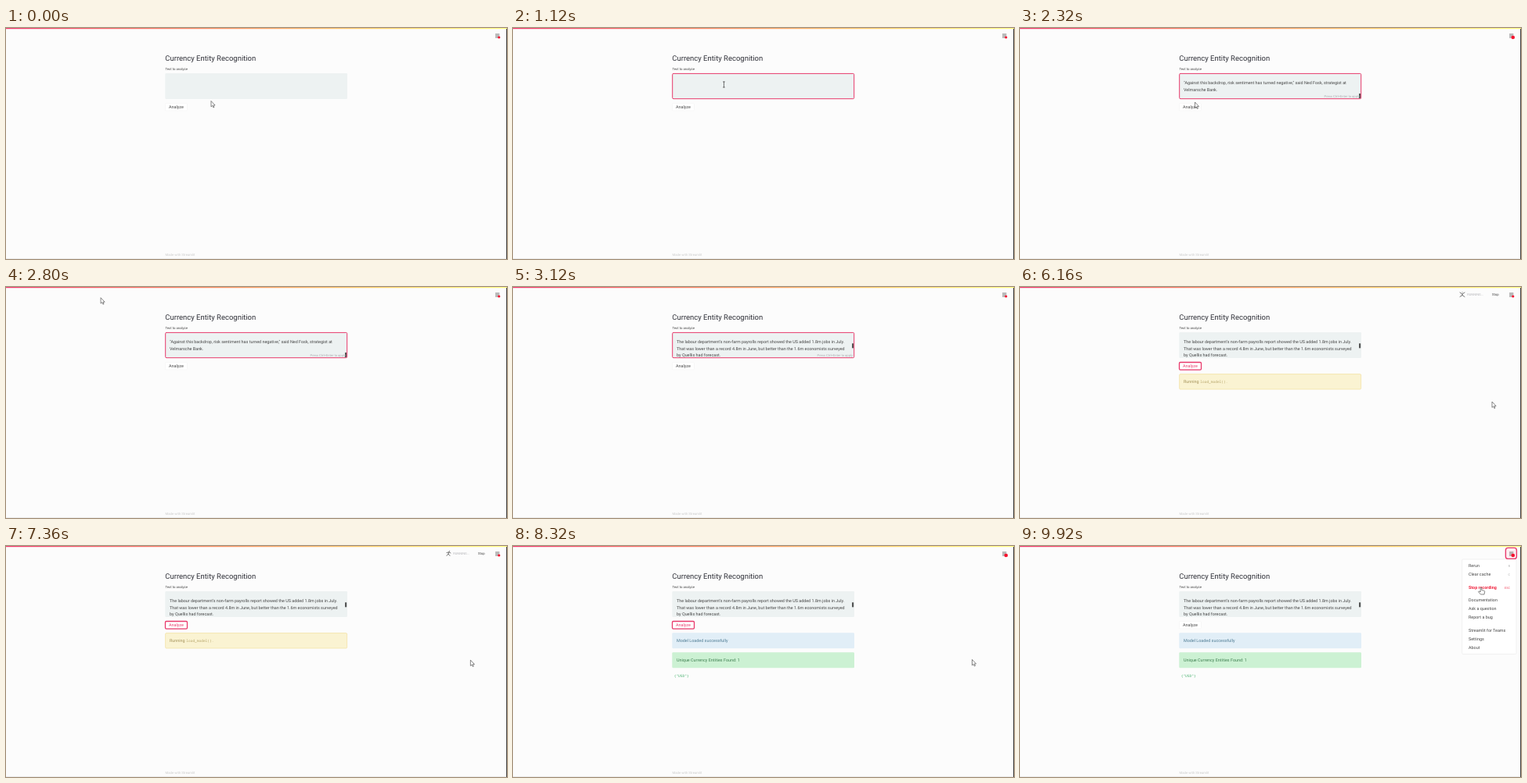
An HTML page for the animation above (10000 ms loop, 640 px wide and 296 px high).

```html
<!DOCTYPE html>
<html lang="en">
<head>
<meta charset="utf-8">
<title>Currency Entity Recognition</title>
<style>
  html, body { margin: 0; width: 100%; height: 100%; overflow: hidden; background: #fcfcfc; }
  svg { display: block; width: 100vw; height: 100vh; }
  text { font: 5.42px Roboto, sans-serif; fill: #444; white-space: pre; text-rendering: geometricPrecision; }
  .title { font-size: 9.49px; fill: #2f3038; }
  .small { font-size: 4.27px; }
  .hint { font-size: 4.15px; fill: #aeb0b4; }
  .faint { fill: #cbcbcb; }
  .mono { font: 4.5px "Noto Sans Mono", monospace; }
  .red { fill: #f0203c; font-weight: 700; }
  .pink { fill: #e83a6c; }
  .ring { fill: none; stroke: #e83a6c; }
  .line { fill: none; stroke: #555; stroke-width: .8; stroke-linecap: round; stroke-linejoin: round; }
  .pointer { fill: #fff; stroke: #555; stroke-width: .7; stroke-linejoin: round; }
</style>
</head>
<body>
<svg viewBox="0 0 640 296">
  <defs>
    <linearGradient id="rainbow">
      <stop offset="0" stop-color="#f0386b"/>
      <stop offset=".4" stop-color="#fa8b62"/>
      <stop offset=".75" stop-color="#fdd36a"/>
      <stop offset="1" stop-color="#fffd80"/>
    </linearGradient>
    <clipPath id="field"><rect x="204" y="58.5" width="232" height="32"/></clipPath>
  </defs>

  <rect width="640" height="296" fill="#fcfcfc"/>
  <rect y="295" width="640" height="1" fill="#ececec"/>
  <rect width="640" height="1.2" fill="url(#rainbow)"/>
  <rect x="639" y="1" width="1" height="295" fill="#444"/>

  <text class="title" x="203.3" y="42">Currency Entity Recognition</text>
  <text class="small" x="203.5" y="54.3">Text to analyze</text>
  <text class="small faint" x="203.5" y="291.5">Made with Streamlit</text>

  <!-- text area -->
  <rect x="203.3" y="58" width="232.7" height="33" rx="1.3" fill="#edf2f2"/>
  <g clip-path="url(#field)">
    <g data-on="1200 3040">
      <text x="209" y="72.3">"Against this backdrop, risk sentiment has turned negative," said Ned Fosk, strategist at</text>
      <text x="209" y="80.6">Velmarsche Bank.</text>
      <rect x="433" y="84" width="2.2" height="6" fill="#555"/>
    </g>
    <g data-on="3040 10000">
      <text x="209" y="72.3">The labour department's non-farm payrolls report showed the US added 1.8m jobs in July.</text>
      <text x="209" y="80.6">That was lower than a record 4.8m in June, but better than the 1.6m economists surveyed</text>
      <text x="209" y="88.9">by Quellis had forecast.</text>
      <rect x="433" y="72.3" width="2.2" height="6" fill="#555"/>
    </g>
    <text class="hint" x="434" y="89" text-anchor="end" data-on="1200 4320">Press Ctrl+Enter to apply</text>
  </g>
  <rect class="ring" x="203.7" y="58.4" width="232" height="32.3" rx="1.3" data-on="960 4320"/>

  <!-- button -->
  <rect x="203.5" y="96.5" width="28" height="9.5" rx="1.3" fill="#fff" stroke="#f0f0f0" stroke-width=".5"/>
  <rect class="ring" x="203.5" y="96.5" width="28" height="9.6" rx="1.3" stroke-width="1.3" data-on="4320 9040"/>
  <text id="analyze" x="208" y="103.2">Analyze</text>

  <!-- results -->
  <g data-on="5280 7440">
    <rect x="203.6" y="111.6" width="232" height="19.4" rx="1.3" fill="#faf3d2" stroke="#f3e0a0" stroke-width=".7"/>
    <text x="209" y="123.3" style="fill:#a39158">Running</text>
    <text class="mono" x="230.3" y="123.3" style="fill:#b5a468">load_model().</text>
  </g>
  <g data-on="7440 10000">
    <rect x="203.3" y="111.3" width="232.7" height="20" rx="1.3" fill="#e1eef7"/>
    <text x="209" y="123.3" style="fill:#4c7a92">Model Loaded successfully</text>
  </g>
  <g data-on="7680 10000">
    <rect x="203.3" y="136.2" width="232.7" height="20" rx="1.3" fill="#ccf1d3"/>
    <text x="209" y="148.2" style="fill:#3c7d4e">Unique Currency Entities Found: 1</text>
    <text class="mono" x="205.7" y="168" style="fill:#3fae68">{"USD"}</text>
  </g>

  <!-- status -->
  <g data-on="4320 7840">
    <path id="runner" class="line"/>
    <text x="571.3" y="11.3" style="font-size:4px;fill:#b4b4b8">RUNNING...</text>
    <text class="small" x="603" y="11.2">Stop</text>
  </g>

  <!-- menu -->
  <g data-on="9040 10000">
    <rect x="564.7" y="17" width="69.3" height="121.5" rx="1.3" fill="#fff" stroke="#ebebeb" stroke-width=".7"/>
    <g id="items"></g>
    <rect class="ring" x="620.4" y="2.4" width="14" height="14" rx="3" stroke-width="1.4" style="fill:#fdeef2"/>
  </g>
  <path class="line" d="M625.5 8h4.5M625.5 10h4.5M625.5 12h4.5"/>
  <circle id="record" cx="629.8" cy="12" fill="#f5142f"/>

  <!-- pointers, with the hot spot at the origin -->
  <g id="pointer">
    <path class="pointer" d="M0 0V7.4L1.7 5.9 2.9 8.5 4 8 2.9 5.5H5.1Z"/>
    <path class="pointer" d="M-.8.6Q0-.6.8.6V3.6L3.9 4.3Q4.8 4.6 4.7 5.6L4 9H-.6L-3.4 5.8Q-3.2 4.6-2 5.1L-.8 6Z"/>
    <path class="line" d="M-1-3.5H1M0-3.5V3.5M-1 3.5H1"/>
  </g>
</svg>
<script>
const LOOP = 10000;
const $ = id => document.getElementById(id);

const menu = [
  ['Rerun', 27, 'R'], ['Clear cache', 38, 'C'], ['Stop recording', 54.9, 'ESC'],
  ['Documentation', 71.4], ['Ask a question', 82.3], ['Report a bug', 93.2],
  ['Streamlit for Teams', 110], ['Settings', 120.9], ['About', 131.9]
];
$('items').innerHTML = menu.map(([label, y, key = '']) => {
  const stop = key === 'ESC';
  return `<text x="573" y="${y}" class="${stop ? 'red' : ''}">${label}</text>
    <text x="626" y="${y}" text-anchor="end" style="font-size:3.8px;fill:${stop ? '#f0405a' : '#aaa'}">${key}</text>`;
}).join('');

// time, x, y
const path = [
  [0, 262, 93.5], [400, 84, -8], [640, 84, -8], [960, 270, 72], [2080, 260, 80],
  [2320, 223.5, 95], [2560, 71, -8], [2720, 71, -8], [2960, 260, 74], [3280, 260, 74],
  [4160, 212, 101], [4720, 212, 103], [5040, 214, 105], [5200, 240, 116],
  [5760, 560, 146], [6160, 603, 147], [8320, 586.5, 145.5], [8480, 588, 145],
  [8960, 628, 9], [9120, 628, 9], [9360, 622, 20], [9920, 589, 53], [LOOP, 589, 53]
];
const poses = [
  'M563 12.5L565 10 567 12.5M565 10L566 7.5M563 8.5L566 7.8 568 9M566.6 6.3h.1',
  'M562 7L565 9.2 568 7M565 9.2V10.5M562 12.5L565 10.5 568 12.5M565 6.8h.1',
  'M564 12.5L564.5 10 567.5 10.5M564.5 10L565.5 7.7 567.5 8.5M566 6.2h.1M562 11h1'
];

const timed = [...document.querySelectorAll('[data-on]')].map(el => [el, ...el.dataset.on.split(' ').map(Number)]);
const within = (v, a, b) => v >= a && v < b;

function pointerAt(t) {
  const i = path.findIndex(p => p[0] > t);
  const [t0, x0, y0] = path[i - 1], [t1, x1, y1] = path[i];
  const k = (t - t0) / (t1 - t0), e = k * k * (3 - 2 * k);
  return [x0 + (x1 - x0) * e, y0 + (y1 - y0) * e];
}

function draw(t) {
  for (const [el, from, to] of timed) el.style.display = within(t, from, to) ? '' : 'none';

  const [x, y] = pointerAt(t);
  const onButton = within(x, 203, 232) && within(y, 96.5, 106.5);
  const onMenu = within(x, 620, 635) && within(y, 2, 17) || t > 9040 && x > 565 && within(y, 17, 138);
  const inField = within(x, 203, 436) && within(y, 58, 91);
  const hidden = within(t, 1200, 2080) || within(t, 3040, 3280);
  const shape = hidden ? -1 : onButton || onMenu ? 1 : inField ? 2 : 0;
  $('pointer').setAttribute('transform', `translate(${x} ${y})`);
  [...$('pointer').children].forEach((el, i) => el.style.display = i === shape ? '' : 'none');

  $('analyze').setAttribute('class', onButton || within(t, 4320, 9040) ? 'pink' : '');
  $('runner').setAttribute('d', poses[Math.floor(t / 240) % poses.length]);
  const pulse = Math.max(0, Math.sin(2 * Math.PI * (t / 1600 - .07)));
  $('record').setAttribute('r', 1.6 + pulse);
}

function tick() {
  draw(performance.now() % LOOP);
  requestAnimationFrame(tick);
}
tick();
</script>
</body>
</html>
```
